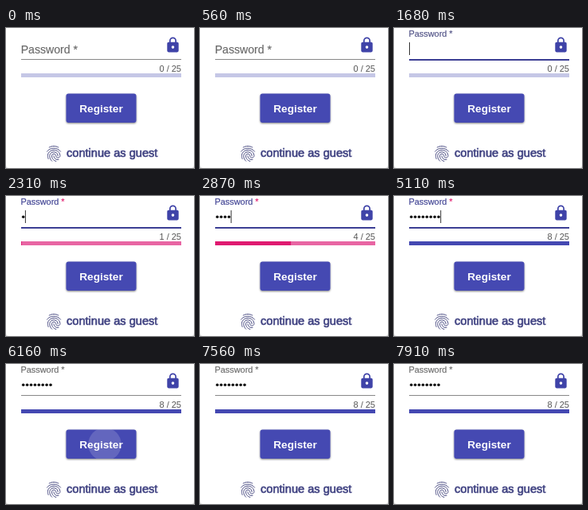
Recreate the animation shown at these times as an HTML page. Size 236 px wide and 176 px high, loop 7.98 s.

```html
<!DOCTYPE html>
<html lang="en">
<head>
<meta charset="utf-8">
<title>Register form</title>
<style>
  html, body { margin: 0; width: 100%; height: 100%; overflow: hidden; background: #ddd; }
  svg { display: block; width: 236px; height: 176px; }
  text { font-family: "Liberation Sans", Arial, sans-serif; }
</style>
</head>
<body>
<svg viewBox="0 0 236 176">
  <defs>
    <clipPath id="face"><rect x="75.5" y="82.5" width="88" height="36.5" rx="3"/></clipPath>
    <filter id="shadow" x="-10%" y="-20%" width="120%" height="150%">
      <feDropShadow dx="0" dy="1" stdDeviation="1.1" flood-opacity=".5"/>
    </filter>
  </defs>
  <rect y="-10" width="236" height="186" rx="4" fill="#fff"/>

  <text id="label" stroke-width=".15">Password <tspan id="star">*</tspan></text>
  <g id="dots" fill="#111"></g>
  <rect id="caret" y="18" width="1" height="16" fill="#333"/>
  <path fill="#3f43a8" fill-rule="evenodd" transform="translate(198.7 10.6) scale(.9)"
    d="M18 8h-1V6a5 5 0 0 0-10 0v2H6a2 2 0 0 0-2 2v10a2 2 0 0 0 2 2h12a2 2 0 0 0 2-2V10a2 2 0 0 0-2-2zM12 17a2 2 0 1 1 0-4 2 2 0 0 1 0 4zM15.1 8H8.900V6a3.1 3.1 0 0 1 6.2 0z"/>
  <rect x="19" y="39" width="201" height="1" fill="#888"/>
  <rect id="line" y="39" height="2" fill="#3b3e94"/>
  <text id="count" x="220" y="55.3" font-size="11" text-anchor="end" fill="#555"></text>
  <rect id="track" x="19" y="57" width="201" height="5"/>
  <rect id="bar" x="19" y="57" height="5"/>

  <rect x="75.5" y="82.5" width="88" height="36.5" rx="3" fill="#4448b2" filter="url(#shadow)"/>
  <g clip-path="url(#face)"><circle id="ripple" cx="124" cy="101" fill="#fff"/></g>
  <text x="119.5" y="106" font-size="13.6" font-weight="bold" text-anchor="middle" fill="#fff">Register</text>

  <path transform="translate(48 146)" fill="none" stroke="#4c4e84" stroke-linecap="round"
    d="M6.2 4C10 2 14 2 17.8 4M3.5 9.2C7.5 3.7 16.5 3.7 20.5 9.2M9.7 21.3c-.9-.9-1.300-1.400-2-2.500-.6-1.200-.9-2.600-.9-4.100 0-2.700 2.300-4.900 5.200-4.900s5.200 2.200 5.200 4.900M12 14.700c0 1.500.8 3 2.100 3.900 1.100.8 2.400 1 3.900.8M14.900 21.500c-1.500-.4-2.400-.9-3.400-1.900-1.300-1.300-2-3-2-4.900 0-1.300 1.100-2.400 2.600-2.400s2.600 1.100 2.600 2.400c0 1.600 1.400 2.400 2.600 2.400s2.600-.9 2.600-2.400c0-4-3.500-7.300-7.800-7.300-3 0-5.800 1.700-7.100 4.300-.4.9-.6 1.900-.6 3 0 .9.1 2.200.7 3.800"/>
  <text x="76" y="162" font-size="14.6" fill="#3e4080" stroke="#3e4080" stroke-width=".6">continue as guest</text>
</svg>
<script>
const LOOP = 7980, LEFT = 19, WIDTH = 201, PITCH = 4.9;
const FOCUS = 1520, BLUR = 6000;
const keys = [2310, 2450, 2590, 2800, 3150, 3220, 3290, 3710];
// strength gains: start, duration, percent
const gains = [[2290, 250, 20], [2500, 260, 20], [2740, 320, 20], [3700, 420, 40]];

const $ = id => document.getElementById(id);
const set = (id, attrs) => {
  for (const k in attrs) $(id).setAttribute(k, attrs[k]);
};
const ramp = (t, start, length) => Math.min(1, Math.max(0, (t - start) / length));
const smooth = p => p * p * (3 - 2 * p);
const mix = (a, b, p) => a + (b - a) * p;
const blend = (a, b, p) => a.map((v, i) => Math.round(mix(v, b[i], p)));
const grey = [105, 105, 105], indigo = [60, 63, 145], pink = [224, 24, 108];

$('dots').innerHTML = keys.map((_, i) =>
  `<circle cx="${21.7 + i * PITCH}" cy="26.3" r="1.8"/>`).join('');

function draw(t) {
  const typed = keys.filter(k => t >= k).length;
  const float = smooth(ramp(t, FOCUS, 150));
  const shown = 1 - ramp(t, BLUR, 130);
  const tint = blend(grey, indigo, ramp(t, FOCUS, 250) * shown);
  const starTint = blend(tint, pink, ramp(t, 1680, 250) * shown);

  set('label', {
    x: mix(18.7, 18.5, float), y: mix(31.8, 11.4, float),
    'font-size': mix(14.1, 10.9, float),
    fill: `rgb(${tint})`, stroke: `rgb(${tint})`
  });
  set('star', { fill: `rgb(${starTint})`, stroke: `rgb(${starTint})` });

  [...$('dots').children].forEach((dot, i) => dot.style.opacity = i < typed ? 1 : 0);
  const caretOn = t >= 1610 && t < 5670 && !(t >= 4480 && t < 5110);
  set('caret', { x: 19 + typed * PITCH, opacity: caretOn ? 1 : 0 });

  const span = WIDTH * mix(.5, 1, float);
  set('line', { x: LEFT + (WIDTH - span) / 2, width: span, opacity: float * shown });
  $('count').textContent = `${typed} / 25`;

  const percent = gains.reduce((sum, [at, length, gain]) =>
    sum + gain * smooth(ramp(t, at, length)), 0);
  const weak = typed > 0 && typed < 8;
  set('track', { fill: weak ? '#e865a3' : '#c5c7e6' });
  set('bar', { width: WIDTH * percent / 100, fill: weak ? '#df1a70' : '#4448b2' });

  set('ripple', {
    r: 58 * ramp(t, BLUR, 450),
    opacity: .16 * (1 - ramp(t, 6400, 400))
  });
}

const start = performance.now();
function tick() {
  draw((performance.now() - start) % LOOP);
  requestAnimationFrame(tick);
}
draw(0);
requestAnimationFrame(tick);
</script>
</body>
</html>
```
